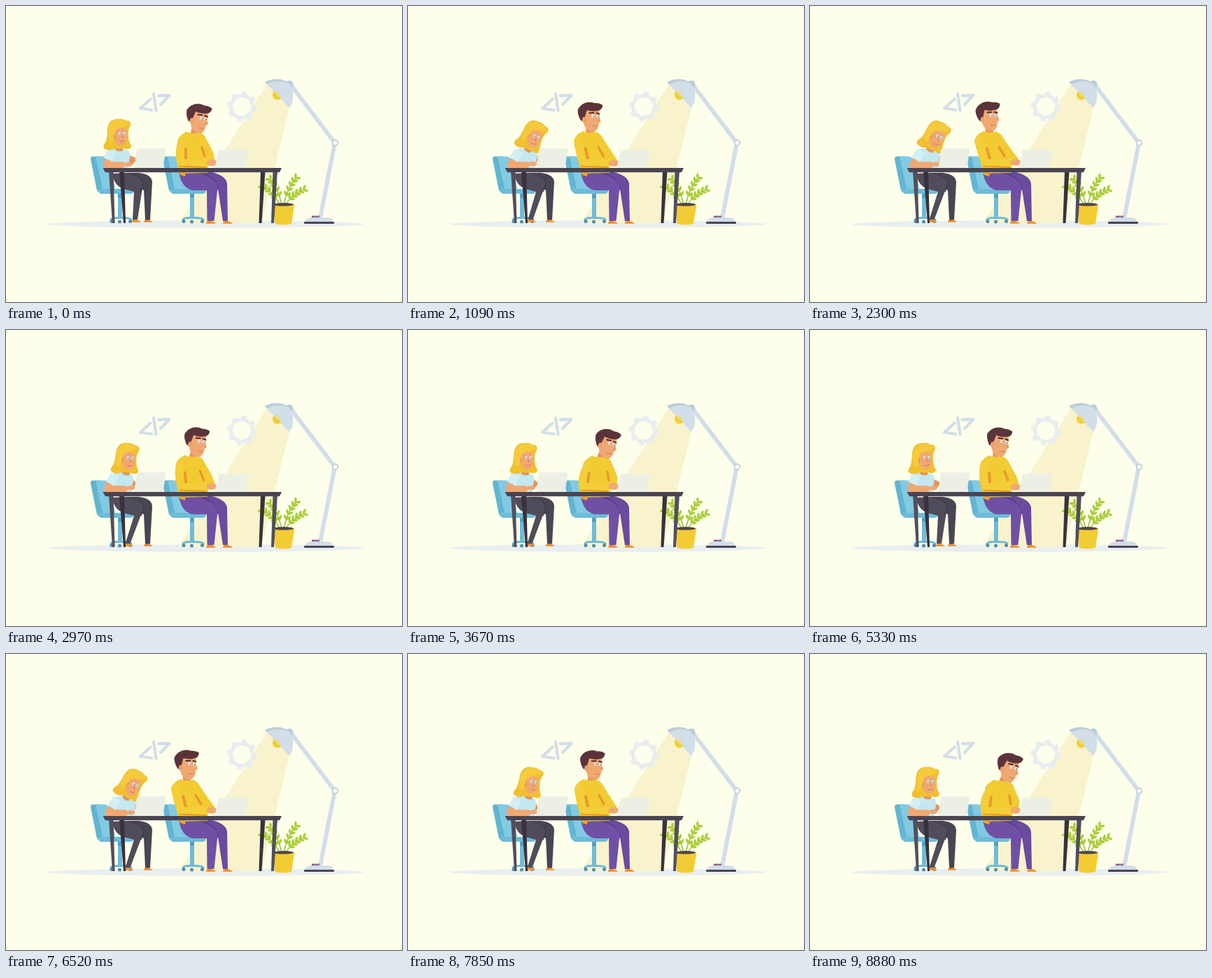
These frames come from a looping animation (566x424 px, 8910 ms). An HTML page:

```html
<!DOCTYPE html>
<html lang="en">
<head>
<meta charset="utf-8">
<title>Office desk</title>
<style>
  html, body { margin: 0; width: 100%; height: 100%; overflow: hidden; background: #fdffeb; }
  svg { display: block; width: 566px; height: 424px; }
  .line { fill: none; stroke-linecap: round; stroke-linejoin: round; }
</style>
</head>
<body>
<svg viewBox="0 0 566 424">
  <defs>
    <g id="chair">
      <path d="M124 215.500H136L146 266H133Q130 266 129.500 262L121 220Q120.500 215.500 124 215.500Z" fill="#62b5d1"/>
      <path d="M128 215.500H141Q146 215.500 148 222L157 266H139Z" fill="#82cae2"/>
      <path d="M131 262H183Q184 269 178 269H136Q132 269 131 262Z" fill="#6dbcd8"/>
      <path d="M160 269H166V303H160Z" fill="#6dbcd8"/>
      <path d="M160 269H166V275H160Z" fill="#559fbd"/>
      <path d="M150 306Q151 303.500 158 303.500H169Q177 303.500 179 306" stroke="#6dbcd8" stroke-width="3" class="line"/>
      <g fill="#4c8faf"><circle cx="151" cy="308.500" r="2.500"/><circle cx="162.500" cy="309" r="2.500"/><circle cx="177.500" cy="308.500" r="2.500"/></g>
    </g>
  </defs>

  <ellipse cx="285.500" cy="312.500" rx="226" ry="5.300" fill="#e9eef0"/>
  <path d="M374 110L405 146L365 311H247Z" fill="#f8f3cc"/>
  <g id="gear" transform="translate(337 144) rotate(10)" fill="#e8edef"></g>

  <g class="line" stroke="#d2dee8" stroke-width="4.300">
    <path d="M206.500 133.500L192 146.500L208 149"/>
    <path d="M211 126L214.500 149.500"/>
    <path d="M218 128.500L233.500 128L221 141"/>
  </g>

  <g id="lamp">
    <path d="M407 113L470 196L449 304" class="line" stroke="#d2dee8" stroke-width="6"/>
    <circle cx="405" cy="112" r="5.500" fill="#bccddc"/>
    <path d="M370 109C382 103 394 104 402 109C412 117 413 135 405 146Z" fill="#d2dee8"/>
    <path d="M370 109C382 103 394 104 402 109L404 111C394 107 384 107 374 112Z" fill="#bccddc"/>
    <path d="M383 122.500L393 132.500A6 6 0 1 1 383 122.500Z" fill="#f2cf31"/>
    <path d="M384 123.500Q391 122 391.500 130.500" class="line" stroke="#f5db58" stroke-width="1.600"/>
    <circle cx="470.500" cy="196" r="3.800" fill="#fff" stroke="#bccddc" stroke-width="1.800"/>
    <path d="M427 309Q429 303 438 303H459Q466 303 468 309Z" fill="#d2dee8"/>
    <path d="M437 300.500H448V303H437Z" fill="#b04b72"/>
    <path d="M440 301.500H448V303H440Z" fill="#6f7fb0"/>
    <rect x="426" y="309" width="43" height="3" rx="1" fill="#4a4452"/>
  </g>

  <g id="plant"></g>
  <path d="M380.500 284H412.500L408 312Q396 315 385 312Z" fill="#f2cc33"/>
  <ellipse cx="396.500" cy="284.300" rx="14.500" ry="2.300" fill="#51444a"/>

  <use href="#chair"/>
  <use href="#chair" x="103"/>

  <g id="womanLegs">
    <path d="M197 309.800Q197 305.500 202 306Q208 307 209.500 309.800Z" fill="#f08c28"/>
    <path d="M170 239H190Q208 241 209 252L206 306.500H199L197 264L172 256Z" fill="#4a4552"/>
    <path id="shin" fill="#514c59"/>
    <path id="shinEdge" class="line" stroke="#3d3845" stroke-width="1.200"/>
    <path id="shoe" fill="#f08c28"/>
  </g>

  <g id="manLegs">
    <path d="M310 311.800Q310 307.500 315 308Q322 308.500 324 311.800Z" fill="#f08c28"/>
    <path d="M286 311.800Q286 307.500 291 308Q298 308.500 300 311.800Z" fill="#f08c28"/>
    <path d="M268 237H290Q314 242 316 254L317 308H310L303 262L276 256Z" fill="#6a4b9e"/>
    <path d="M270 238L284 240Q302 247 303.500 264L298 262Z" fill="#573a86"/>
    <path d="M247.500 240L270 238Q300 245 302.500 260L297.500 308H287.500L287 264H266Q251 260 247.500 240Z" fill="#7050a5"/>
  </g>

  <g id="woman">
    <path id="wFar" class="line" stroke="#e3955f" stroke-width="7"/>
    <path id="wBody" fill="#c3e8ef"/>
    <path id="wNear" class="line" stroke="#f0a873" stroke-width="9"/>
    <path id="wSleeve" class="line" stroke="#d2eff4" stroke-width="13" style="stroke-linecap:butt"/>
    <ellipse id="wHand" rx="6" ry="3.300" fill="#f0a873"/>
    <g id="wHead">
      <path d="M-4 -8H7L6 4Q1 7 -5 3Z" fill="#e3955f"/>
      <path d="M-16 -27Q-14 -42 -1 -41Q6 -42 10 -39Q18 -39 17 -32Q13 -27 14 -17Q14 -9 18 -3Q17 4 8 1L-5 1Q-14 6 -21 1Q-23 -3 -18 -9Q-16 -17 -16 -27Z" fill="#f0c030"/>
      <path d="M-7 -28Q3 -30 11 -27L12 -15Q11 -3 4 -3Q-4 -3 -7 -14Z" fill="#f0a873"/>
      <ellipse cx="-7" cy="-17" rx="2.500" ry="3.500" fill="#e3955f"/>
      <path d="M-15 -24Q-13 -40 0 -40Q15 -40 15 -33Q3 -30 -5 -25Q-7 -16 -8 -9Q-12 -6 -15 -10Z" fill="#f5ca3c"/>
      <g fill="#f4f6f2" stroke="#b0b9b6" stroke-width=".5"><circle cx="2" cy="-20.500" r="2.100"/><circle cx="8.500" cy="-20.500" r="2.100"/></g>
      <g fill="#5c7f97"><circle cx="2.700" cy="-20.200" r=".9"/><circle cx="9" cy="-20.200" r=".9"/></g>
      <path d="M5 -19L7 -14L4 -14" fill="#e38c56"/>
      <path d="M2 -9Q5 -8 8 -10" class="line" stroke="#d0794f"/>
    </g>
  </g>

  <g id="man">
    <path id="mNeck" class="line" stroke="#e3955f" stroke-width="11"/>
    <path id="mBody" fill="#f2cb33"/>
    <path d="M248 238H257L256 244L249 242Z" fill="#eda52c"/>
    <path id="mFarShade" class="line" stroke="#e89a2b" stroke-width="3.500"/>
    <path id="mFar" class="line" stroke="#f2cb33" stroke-width="9"/>
    <path id="mShade" class="line" stroke="#e89a2b" stroke-width="4"/>
    <path id="mNear" class="line" stroke="#f4ce38" stroke-width="10"/>
    <path d="M248 229.500L285 231" class="line" stroke="#e89a2b" stroke-width="1.800"/>
    <ellipse id="mHand" rx="7.500" ry="4.800" fill="#f0a873"/>
    <g id="mHead">
      <path d="M-13 -30H11L12 -18Q12 0 4 1Q-6 1 -10 -9Z" fill="#f0a873"/>
      <path d="M12 -20L14 -14L10 -13Z" fill="#e8995f"/>
      <path d="M-14 -13Q-20 -21 -20 -29Q-17 -35 -14 -37Q-6 -43 4 -40Q10 -41 15 -38Q15 -31 9 -29.500Q1 -27 -7 -29L-10 -15Z" fill="#5b343b"/>
      <ellipse cx="-10" cy="-15" rx="2.800" ry="4" fill="#eb9f69"/>
      <path d="M-3 -25.500L3 -26M7 -26L11 -25" class="line" stroke="#4c2a31" stroke-width="2"/>
      <g fill="#f4f6f2"><circle cx="2.500" cy="-21.500" r="2.200"/><circle cx="9" cy="-21.500" r="2"/></g>
      <g fill="#4b6d83"><circle cx="3.300" cy="-21.200" r=".9"/><circle cx="9.600" cy="-21.200" r=".9"/></g>
      <path d="M3 -7Q6 -8 9 -7" class="line" stroke="#cc7b4e"/>
    </g>
  </g>

  <g fill="#ecefe3">
    <path d="M189 204H226.500Q228.500 204 228.200 206L224.500 232H183.500L187 206Q187.300 204 189 204Z"/>
    <path d="M306 206H344Q346.500 206 346 208L341.500 232H298.500L303.500 208Q304 206 306 206Z"/>
  </g>

  <g id="desk">
    <path d="M162 237H169L171 311H168Z" fill="#37323d"/>
    <path d="M364 237H370.500L365.500 311H361.500Z" fill="#37323d"/>
    <path d="M147 237H153.500L155.500 311H152Z" fill="#544e5b"/>
    <path d="M381.500 237H388L383 311H379Z" fill="#544e5b"/>
    <path d="M138.500 232H394L391 238.200H142Z" fill="#4a4452"/>
  </g>
</svg>
<script>
const LOOP = 8910, CYCLE = 5210;
const el = id => document.getElementById(id);
const set = (id, attrs) => { for (const k in attrs) el(id).setAttribute(k, attrs[k]); };

// gear: ring plus eight teeth
let teeth = '<circle r="15.500" fill="none" stroke="#e8edef" stroke-width="5"/>';
for (let i = 0; i < 8; i++)
  teeth += `<path d="M-4.500 -16L-3.300 -21.500H3.300L4.500 -16Z" transform="rotate(${i * 45})"/>`;
el('gear').innerHTML = teeth;

// plant: curved stems with paired leaves
const stems = [[391, 367, 258], [394, 378, 249], [397, 414, 247], [400, 425, 263]];
el('plant').innerHTML = stems.map(([x0, x1, y1]) => {
  const mx = x0 + (x1 - x0) * .35, my = 283 + (y1 - 283) * .65;
  let out = `<path d="M${x0} 284Q${mx} ${my} ${x1} ${y1}" class="line" stroke="#8db32b" stroke-width="1.300"/>`;
  for (let i = 1; i <= 5; i++) {
    const u = .1 + i * .18, v = 1 - u;
    const x = v * v * x0 + 2 * u * v * mx + u * u * x1;
    const y = v * v * 284 + 2 * u * v * my + u * u * y1;
    const dir = Math.atan2(v * (my - 284) + u * (y1 - my), v * (mx - x0) + u * (x1 - mx)) * 180 / Math.PI;
    for (const side of [-42, 42])
      out += `<ellipse cx="3.500" rx="3.800" ry="1.800" fill="#abcf37" transform="translate(${x} ${y}) rotate(${dir + side})"/>`;
  }
  return out;
}).join('');

// time, head x, head y, head tilt, neck x, neck y
const manKeys = [
  [0, 272, 181, 12, 267, 181], [120, 268, 180.5, 10, 265, 180.5],
  [1310, 259, 178.5, 3, 258, 180], [1800, 255, 178, 0, 256, 180],
  [2300, 256.5, 178, 0, 257, 180], [2640, 264, 179, 4, 260, 180],
  [3670, 280, 182.5, 16, 272, 181]
];
// time, head x, head y, head tilt, neck x, elbow x, hand x, foot x
const womanKeys = [
  [0, 161, 203, 0, 160, 144, 170, 186], [120, 162, 203, 0, 160.5, 144, 171, 186],
  [1310, 172, 204, 25, 168, 146, 174, 175.5], [2300, 172, 204, 24, 168, 146, 176, 175.5],
  [2640, 172, 203, 8, 166, 145, 175, 175.5], [3670, 167, 203, 1, 163, 144, 171, 175.5]
];

// cyclic monotone cubic through the keys
function pose(keys, t) {
  const n = keys.length;
  const at = i => {
    const turn = Math.floor(i / n), k = keys[i - turn * n];
    return [k[0] + turn * CYCLE, ...k.slice(1)];
  };
  let i = n - 1;
  while (keys[i][0] > t) i--;
  const [a, b, c, d] = [-1, 0, 1, 2].map(o => at(i + o));
  const h = c[0] - b[0], s = (t - b[0]) / h;
  const slope = (p, q, j) => (q[j] - p[j]) / (q[0] - p[0]);
  const mean = (m, k) => m * k <= 0 ? 0 : 2 * m * k / (m + k);
  return b.slice(1).map((v, j) => {
    j++;
    const mid = slope(b, c, j);
    const m0 = mean(slope(a, b, j), mid) * h, m1 = mean(mid, slope(c, d, j)) * h;
    const diff = c[j] - v;
    return v + m0 * s + (3 * diff - 2 * m0 - m1) * s * s + (m0 + m1 - 2 * diff) * s * s * s;
  });
}

function drawMan(t) {
  const [hx, hy, tilt, nx, ny] = pose(manKeys, t);
  const tap = Math.sin(t / 55) * .6;
  const elbow = 286 + (nx - 257) * .6;
  set('mHead', { transform: `translate(${hx} ${hy}) rotate(${tilt})` });
  set('mNeck', { d: `M${hx - 1} ${hy - 6}L${(nx + hx) / 2} ${ny + 1}` });
  set('mBody', { d: `M${nx - 9} ${ny - 1}Q${nx} ${ny + 3} ${nx + 9} ${ny}Q${nx + 18} ${ny + 3} ${nx + 20} ${ny + 12}
    Q${elbow} 211 289 232L288 239L248 240Q245 232 244.500 226Q${nx * .1 + 214} 212 ${nx - 22} ${ny + 14}Q${nx - 22} ${ny + 6} ${nx - 9} ${ny - 1}Z` });
  set('mFarShade', { d: `M${nx + 13} ${ny + 22}L${elbow - 8} 215` });
  set('mFar', { d: `M${nx + 15} ${ny + 11}L${elbow} 211L294 221` });
  set('mShade', { d: `M${nx * .4 + 150} ${ny + 24}L257 219` });
  set('mNear', { d: `M${nx - 15} ${ny + 13}Q${nx * .1 + 221} 208 250 224L285 225` });
  set('mHand', { cx: 294, cy: 224.5 + tap });
}

function drawWoman(t) {
  const [hx, hy, tilt, nx, ex, hand, foot] = pose(womanKeys, t);
  const tap = Math.sin(t / 50 + 1) * .6;
  set('wHead', { transform: `translate(${hx} ${hy}) rotate(${tilt})` });
  set('wBody', { d: `M${nx - 13} 205Q${nx} 202 ${nx + 13} 206Q${nx + 20} 210 ${nx + 16} 221L${nx + 14} 234H151L${nx - 15} 215Z` });
  set('wSleeve', { d: `M${nx - 9} 207L${(nx - 16 + ex) / 2 + 2} 220` });
  set('wNear', { d: `M${nx - 13} 214L${ex} 227.500L${hand - 4} 227.500` });
  set('wFar', { d: `M${nx + 15} 217L182 220L178 225` });
  set('wHand', { cx: hand + 5, cy: 226.5 + tap });
  const knee = 196 + (186 - foot) * .1;
  set('shin', { d: `M152 240L174 239Q${knee - 3} 242 ${knee} 254L${foot + 2} 306H${foot - 5}
    L183 266L168 262Q154 257 152 240Z` });
  set('shinEdge', { d: `M176 240Q${knee - 2} 243 ${knee} 254L${knee - 4} 266` });
  set('shoe', { d: `M${foot - 6} 309.800Q${foot - 6} 305.500 ${foot - 1} 306Q${foot + 5} 307 ${foot + 6.5} 309.800Z` });
}

function frame() {
  const t = performance.now() % LOOP % CYCLE;
  drawMan(t);
  drawWoman(t);
  requestAnimationFrame(frame);
}
frame();
</script>
</body>
</html>
```
